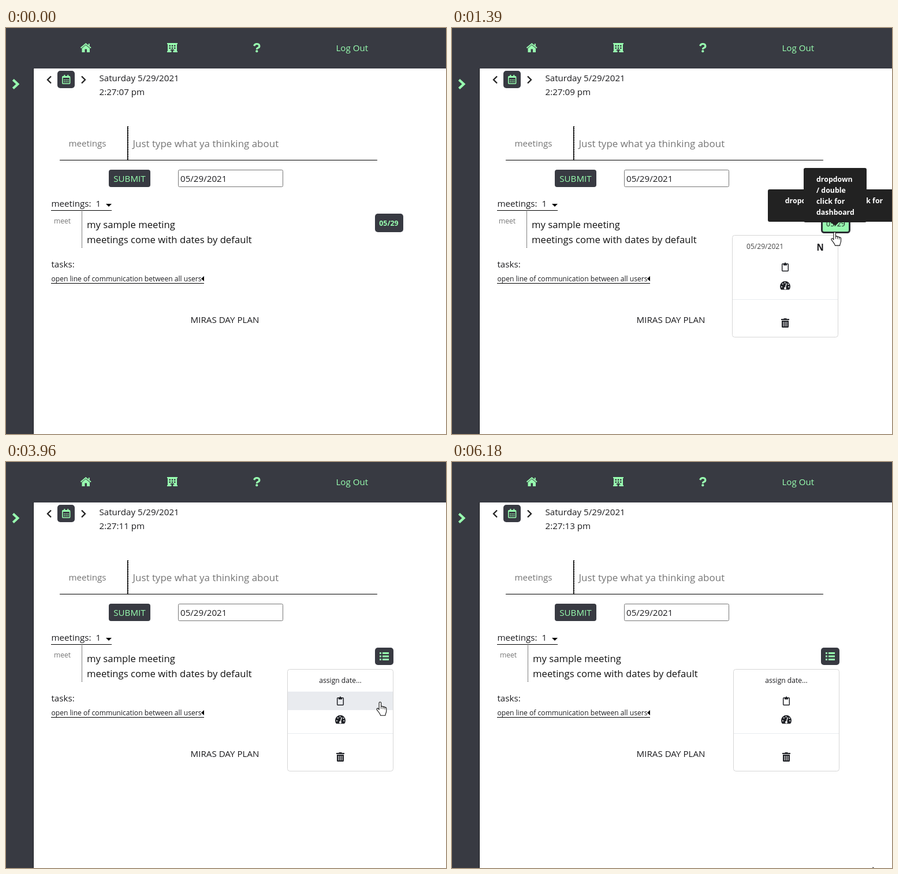
Animation of 762x702 px, one loop 6250 ms. Source, as an HTML page:

```html
<!DOCTYPE html>
<html lang="en">
<head>
<meta charset="utf-8">
<title>Planner</title>
<style>
  html, body { margin: 0; width: 100%; height: 100%; overflow: hidden; background: #fff; }
  svg { display: block; }
  text { font: 15.15px "Open Sans", "Noto Sans", sans-serif; fill: #1c1c1f; white-space: pre; }
  .big { font-size: 16.7px; fill: #111; }
  .hint { font-size: 16.95px; fill: #757575; }
  .small { font-size: 12.1px; }
  .tiny { font-size: 12.4px; }
  .bold { font-size: 12.4px; font-weight: 700; }
  .gray { fill: #757575; }
  .mid { text-anchor: middle; }
  .dark { fill: #383a42; }
  .ink { fill: #1f2126; }
  .green { fill: #98ffb0; }
  .line { fill: none; stroke: #000; }
  .tip { fill: #222; }
  .tip text { fill: #fff; }
  .cursor { fill: #fff; stroke: #111; stroke-width: 1.1; stroke-linejoin: round; }
</style>
</head>
<body>
<svg width="762" height="702" viewBox="0 0 762 702">
  <!-- navigation -->
  <path class="dark" d="M0 0H762V70H48V702H0Z"/>
  <path class="line" d="M47.5 70V702" stroke-dasharray="1 1"/>
  <g class="green">
    <path d="M138 29.5L145 35.3V42H140V36.500H136.500V42H131.500V35.300Z"/>
    <path d="M129.500 34.500L138.200 27.300L147 34.500M143.800 27V31" fill="none" stroke="#98ffb0" stroke-width="1.900"/>
    <path fill-rule="evenodd" d="M279 26H297V28H296V40H297V42H289.500V39H286.500V42H279V40H280V28H279ZM282.500 29.500V32H285V29.500ZM286.700 29.500V32H289.300V29.500ZM291 29.500V32H293.500V29.500ZM282.500 33.500V36H285V33.500ZM286.700 33.500V36H289.300V33.500ZM291 33.500V36H293.500V33.500ZM284 39H292Q291 36.800 288 36.800T284 39Z"/>
    <path d="M429.500 31Q431 27.500 434.200 27.500C440 27.500 439.800 33 436.500 34.200Q434.500 35 434.500 37" fill="none" stroke="#98ffb0" stroke-width="3.200"/>
    <circle cx="434.300" cy="40.200" r="2.100"/>
    <text class="green" x="571.500" y="40">Log Out</text>
    <path d="M12.300 89.500L20.300 97L12.300 104.500" fill="none" stroke="#98ffb0" stroke-width="4.200"/>
  </g>

  <!-- date strip -->
  <path d="M78 83.500L72 89.500L78 95.500M131 83.500L137 89.500L131 95.500" fill="none" stroke="#222" stroke-width="2.300"/>
  <rect class="dark" x="89" y="74" width="30" height="30" rx="5"/>
  <g fill="none" stroke="#98ffb0" stroke-width="1.600">
    <rect x="97.800" y="83.800" width="12.800" height="12.400" rx="1"/>
    <path d="M98 85H111M101.300 81V84M107.300 81V84" stroke-width="2"/>
    <path d="M100.200 89.700H109M100.200 93H109" stroke-dasharray="2 1.100"/>
  </g>
  <text x="161.500" y="92">Saturday 5/29/2021</text>
  <text id="clock" x="161.500" y="116"></text>

  <!-- entry form -->
  <text class="gray" x="108.500" y="205">meetings</text>
  <path class="line" d="M210.500 170V228"/>
  <path class="line" d="M211.500 170V228" stroke-dasharray="2 1"/>
  <path class="line" d="M93 228.500H643"/>
  <text class="hint" x="219.500" y="206">Just type what ya thinking about</text>
  <rect class="dark" x="178" y="245" width="72" height="30" rx="4"/>
  <text class="green mid" x="214" y="266">SUBMIT</text>
  <rect x="298.500" y="245.500" width="181" height="29" rx="2" fill="#fff" stroke="#767676"/>
  <text x="302" y="266">05/29/2021</text>

  <!-- list -->
  <text x="78.500" y="309">meetings:</text>
  <text x="155.500" y="309">1</text>
  <path d="M173 304H183L178 309Z"/>
  <path class="line" d="M78 315.500H183M78 441.500H343"/>
  <g id="entry">
    <text class="small gray" x="83" y="338">meet</text>
    <path class="line" d="M131.500 317V380" stroke-dasharray="1 1"/>
    <text class="big" x="140" y="346">my sample meeting</text>
    <text class="big" x="140" y="372">meetings come with dates by default</text>
  </g>
  <text x="78.500" y="414">tasks:</text>
  <text class="small" x="78.500" y="438">open line of communication between all users</text>
  <path d="M343 429V438L338 433.500Z"/>
  <text class="mid" x="379" y="510">MIRAS DAY PLAN</text>

  <!-- item button, three looks -->
  <g id="plain">
    <rect class="dark" x="639" y="321" width="49" height="32" rx="5"/>
    <text class="bold green mid" x="663" y="342">05/29</text>
  </g>
  <g id="hover">
    <rect x="640.500" y="322.500" width="48" height="31" rx="4" fill="#98fbb0" stroke="#2b2d34" stroke-width="3"/>
    <text class="tiny mid" x="664.500" y="343">05/29</text>
  </g>
  <g id="list">
    <rect class="dark" x="639" y="321" width="32" height="30" rx="5"/>
    <path d="M647 330.500H650M652 330.500H663M647 336H650M652 336H663M647 341.500H650M652 341.500H663" stroke="#98ffb0" stroke-width="2.800"/>
  </g>

  <!-- dropdown -->
  <g id="menu">
    <rect x="487.500" y="358.500" width="183" height="176" rx="4" fill="#fff" stroke="#d6d6d6"/>
    <rect id="row" x="488" width="182" height="32" fill="#e9ebef"/>
    <path d="M488 469.500H670" stroke="#e9ecef"/>
    <g id="dated">
      <text class="small" style="fill:#444" x="512" y="382">05/29/2021</text>
      <text style="font-weight:700" x="633.500" y="385">N</text>
    </g>
    <text id="assign" class="small mid" x="579" y="382">assign date...</text>
    <rect x="573.700" y="407.700" width="10.600" height="12.600" rx="1" fill="none" stroke="#1f2126" stroke-width="1.500"/>
    <path class="ink" d="M576 410.500V407H577.500Q579 403.500 580.500 407H582V410.500Z"/>
    <path class="ink" d="M572 452.500A9 9 0 1 1 586 452.500Z"/>
    <path d="M579 449.500L581.500 441.500" stroke="#fff" stroke-width="1.400"/>
    <g fill="#fff">
      <circle cx="579" cy="450" r="2"/><circle cx="573" cy="447.500" r="1.100"/>
      <circle cx="574.800" cy="442.500" r="1.100"/><circle cx="578.500" cy="440.500" r="1.100"/>
      <circle cx="584.500" cy="443" r="1.100"/><circle cx="585.200" cy="447.500" r="1.100"/>
    </g>
    <path class="ink" d="M572 503H576L577 502H581L582 503H586V505H572ZM573 506H585V516.500Q585 518 583.500 518H574.500Q573 518 573 516.500Z"/>
    <path d="M576 508V516M579 508V516M582 508V516" stroke="#fff" stroke-width="1.100"/>
  </g>

  <!-- tooltips -->
  <g id="wide" class="tip">
    <rect id="wideBox" y="268" height="56" rx="3"/>
    <path d="M650 324H662L656 330Z"/>
    <g id="echo" opacity=".4">
      <text class="tiny" x="558" y="292">dropdown / double click for</text>
      <text class="tiny" x="558" y="311">dashboard</text>
    </g>
    <text class="bold mid" x="656" y="292">dropdown / double click for</text>
    <text class="bold mid" x="656" y="311">dashboard</text>
  </g>
  <g id="narrow" class="tip">
    <rect x="609" y="242" width="109" height="94" rx="3"/>
    <path d="M658 336H670L664 342Z"/>
    <text class="bold" x="631" y="266">dropdown</text>
    <text class="bold" x="631" y="285">/ double</text>
    <text class="bold" x="631" y="304">click for</text>
    <text class="bold" x="631" y="323">dashboard</text>
  </g>

  <!-- pointers, hot spot at 0,0 -->
  <g id="pointer">
    <path id="arrow" class="cursor" d="M0 0V16L4 12.500L6.500 18.500L9 17.500L6.500 11.500H12Z"/>
    <g id="hand" class="cursor">
      <path d="M-2 1.500A1.800 1.800 0 0 1 1.600 1.500V8C1.800 6.600 4.600 6.600 4.900 8.500C5.300 7.400 7.700 7.500 8 9.300C8.600 8.400 10.600 8.700 10.700 10.500V15.500C10.700 18 9 19.500 8.800 23H.5C0 20 -2 18 -5.500 13.500C-7.100 11.500 -4.700 9.500 -3.200 11.300L-2 13Z"/>
      <path d="M1.600 8V11.500M4.900 8.500V12M8 9.300V12.500" stroke-width=".9"/>
    </g>
    <path id="beam" class="line" d="M-3.500 -7.500H-1L0 -6.500L1 -7.500H3.500M0 -6.500V6.500M-3.500 7.500H-1L0 6.500L1 7.500H3.500" stroke-width="1.300"/>
  </g>
</svg>
<script>
const LOOP = 6250;
const $ = id => document.getElementById(id);
const show = (id, on) => { $(id).style.display = on ? '' : 'none'; };
const fade = (id, a) => $(id).setAttribute('opacity', a);
const shift = (id, x, y = 0) => $(id).setAttribute('transform', `translate(${x} ${y})`);
const ramp = (t, a, b) => Math.min(1, Math.max(0, (t - a) / (b - a)));

// pointer path: time, x, y
const path = [
  [130, 712, 660], [270, 688, 492], [480, 661, 336], [630, 659, 334],
  [1250, 659, 334], [1390, 663, 353], [1600, 639, 378], [1810, 638, 380],
  [3820, 638, 380], [3890, 642, 394], [3960, 648, 415], [4240, 672, 500],
  [4450, 720, 672], [4520, 723.5, 687.5], [4590, 729, 701], [LOOP, 729, 701]
];

function pointerAt(t) {
  const i = Math.max(1, path.findIndex(p => p[0] > t));
  const [a, x, y] = path[i - 1], [b, u, v] = path[i];
  const k = ramp(t, a, b);
  return [x + (u - x) * k, y + (v - y) * k];
}

function draw(t) {
  const [x, y] = pointerAt(t);
  const visible = (t >= 130 && t < 4590) || t >= 6180;
  const cleared = t >= 2610;
  const hover = t >= 420 && t < 1530;
  const open = t >= 770;

  const sec = 7 + Math.floor((t + 782) / 1015.5);
  $('clock').textContent = `2:27:${String(sec).padStart(2, '0')} pm`;

  shift('entry', hover ? -2 : 0);
  shift('menu', hover ? -2 : 0);
  show('plain', !hover && !cleared);
  show('hover', hover);
  show('list', cleared);
  show('menu', open);
  show('dated', !cleared);
  show('assign', cleared);

  const row = [397, 429, 494].find(top => y >= top && y < top + 32);
  const onRow = cleared && visible && row && x < 670;
  show('row', onRow);
  if (onRow) $('row').setAttribute('y', row);

  const gone = 1 - ramp(t, 1460, 1750);
  fade('wide', ramp(t, 420, 693) * gone);
  fade('narrow', ramp(t, 770, 980) * gone);
  shift('wide', open ? 5.5 : 0, open ? 11 : 0);
  const left = open ? 541.5 : 536;
  $('wideBox').setAttribute('x', left);
  $('wideBox').setAttribute('width', 776 - left);
  show('echo', !open);

  const beam = cleared && t < 3890;
  const hand = !beam && (hover || (open && t < 3890) || onRow);
  show('pointer', visible);
  show('beam', beam);
  show('hand', hand);
  show('arrow', !beam && !hand);
  shift('pointer', x, y);
}

const start = performance.now();
function tick() {
  draw((performance.now() - start) % LOOP);
  requestAnimationFrame(tick);
}
tick();
</script>
</body>
</html>
```
